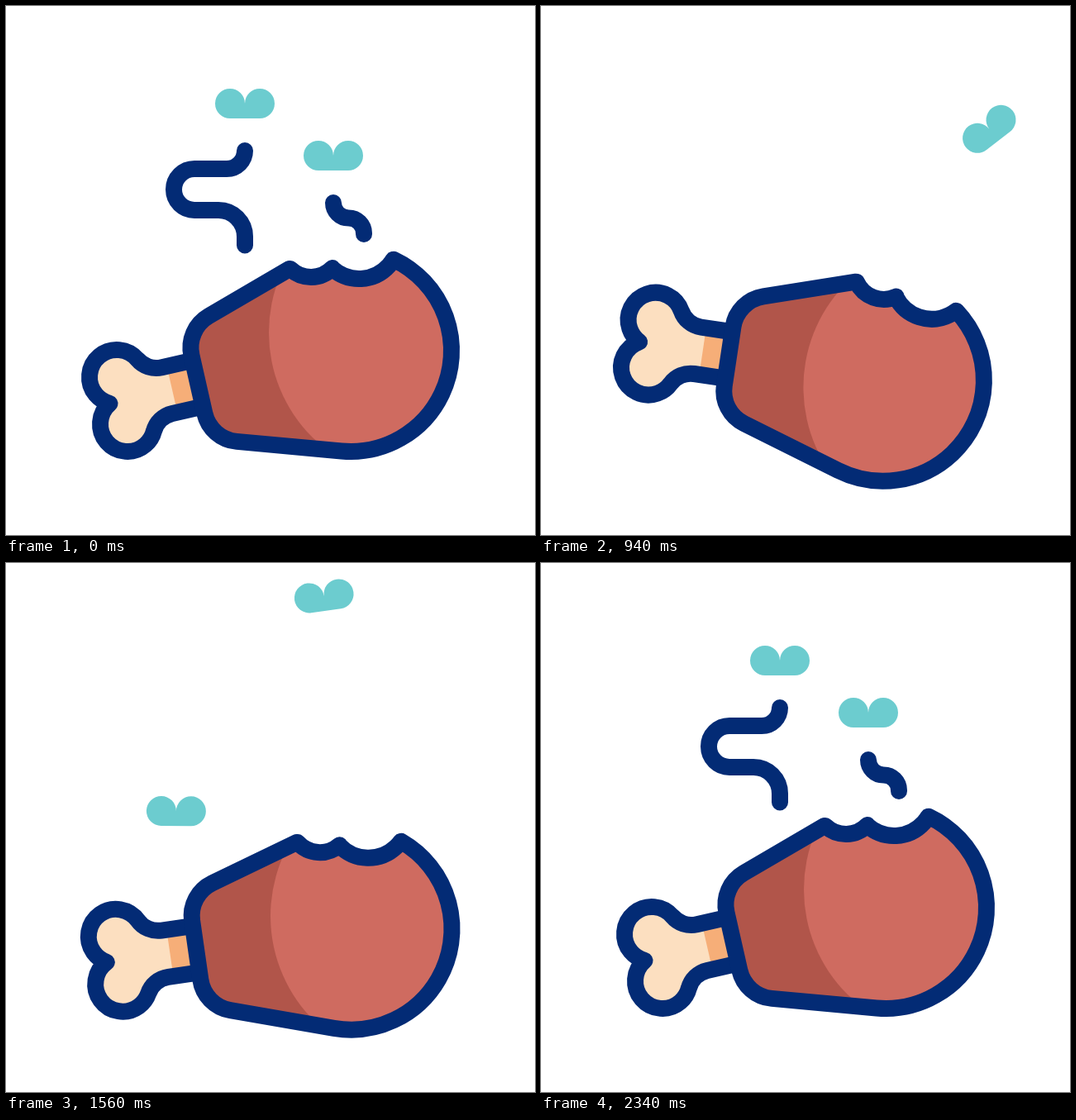
Write an HTML page with a canvas that moves like this. It is 640x640 px and loops after 2.4 s.

```html
<!DOCTYPE html>
<html lang="en">
<head>
<meta charset="utf-8">
<title>Drumstick</title>
<style>
  html, body { margin: 0; width: 100%; height: 100%; overflow: hidden; background: #fff; }
  canvas { display: block; width: 640px; height: 640px; }
</style>
</head>
<body>
<canvas id="stage"></canvas>
<script>
const LOOP = 2400, START = 100, END = 2340;
const NAVY = '#032b75', TEAL = '#6ccccf', MEAT = '#cf6b60', SHADE = '#b1554a',
      BONE = '#fcdfc0', BAND = '#f6ae78';

const canvas = document.getElementById('stage');
const ctx = canvas.getContext('2d');
const ratio = window.devicePixelRatio || 1;
canvas.width = canvas.height = 640 * ratio;

const rad = degrees => degrees * Math.PI / 180;
const smooth = v => { v = Math.min(1, Math.max(0, v)); return v * v * (3 - 2 * v); };
const ramp = (t, from, to) => smooth((t - from) / (to - from));

// The leg crouches, hops backwards, lands with a nod and settles
const tilt = t => 24.8 * ramp(t, 210, 745) - 46.8 * ramp(t, 885, 1220)
                + 31.9 * ramp(t, 1220, 1680) - 9.9 * ramp(t, 1680, 2260);
const lift = t => 25 * ramp(t, 200, 740) - 55 * ramp(t, 740, 1160)
                + 55 * ramp(t, 1160, 1680) - 25 * ramp(t, 1680, 2260);

function stroke(path) {
  ctx.strokeStyle = NAVY;
  ctx.lineWidth = 20;
  ctx.lineCap = ctx.lineJoin = 'round';
  ctx.stroke(path);
}

function bodyPath() {
  const p = new Path2D();
  p.arc(417, 417, 122, rad(-64.7), rad(95.2));
  p.arcTo(247.4, 524, 217.4, 391.5, 44);
  p.arcTo(217.4, 391.5, 343, 318, 44);
  p.lineTo(343, 318);
  p.arc(369, 292, 36, rad(134), rad(44), true);
  p.lineTo(395, 317);
  p.arc(427.2, 281.5, 48.5, rad(132), rad(31.5), true);
  p.closePath();
  return p;
}

// Two overlapping lobes that flow into the neck, mirrored about y = 0
function bonePath() {
  const p = new Path2D(), lobe = 29.2, r = 33, neck = 28.5, end = 94;
  const inner = Math.atan2(lobe, -Math.sqrt(r * r - lobe * lobe)), outer = rad(27);
  p.moveTo(end, -neck);
  p.arcTo(37.4, -neck, 29.4, -44.2, 30);
  p.arc(0, -lobe, r, -outer, inner, true);
  p.arc(0, lobe, r, -inner, outer, true);
  p.arcTo(37.4, neck, end, neck, 30);
  p.lineTo(end, neck);
  return p;
}

const body = bodyPath(), bone = bonePath();

function drawLeg(t) {
  ctx.save();
  ctx.translate(318.5, 427 + lift(t));
  ctx.rotate(rad(tilt(t)));
  ctx.translate(-318.5, -427);

  ctx.save();
  ctx.translate(140.5, 477.5);
  ctx.rotate(rad(-12.85));
  ctx.fillStyle = BONE;
  ctx.fill(bone);
  ctx.fillStyle = BAND;
  ctx.fillRect(62, -28.5, 32, 57);
  stroke(bone);
  ctx.restore();

  ctx.fillStyle = SHADE;
  ctx.fill(body);
  ctx.save();
  ctx.clip(body);
  ctx.fillStyle = MEAT;
  ctx.beginPath();
  ctx.arc(497, 395, 179, 0, 2 * Math.PI);
  ctx.fill();
  ctx.restore();
  stroke(body);
  ctx.restore();
}

const longTrail = new Path2D('M289 175A22 22 0 0 1 267 197H228A25 25 0 0 0 228 247H257A32 32 0 0 1 289 279V289.5');
const shortTrail = new Path2D('M396 238A18.5 18.5 0 0 0 414.5 256.5A18.5 18.5 0 0 1 433 275V276');

function drawTrail(path, length, shown) {
  if (shown <= 0.001) return;
  ctx.save();
  if (shown < 1) ctx.setLineDash([length * shown, length * 2]);
  stroke(path);
  ctx.restore();
}

// A round trip from home through [time, x, y, degrees]
const trip = (x, y, ...stops) => [[START, x, y, 0], ...stops, [END, x, y, 0]];

const leftTrip = trip(289, 118,
  [360, 297.5, 71, -4], [620, 265.5, 1.5, -9.5], [860, -60, -80, 20],
  [1100, -50, 370, 75], [1360, 154.5, 360.5, 57], [1760, 228.5, 236, -43.3]);
const rightTrip = trip(396, 181,
  [360, 445, 195, 24], [620, 528, 202.5, 54.7], [740, 576, 190, 20], [940, 542.5, 149, -37.7],
  [1360, 435, 85, -13.6], [1560, 385, 40, -8], [1760, 323, 66, 0.8]);

// Smooth curve through the stops, at rest at home
function along(stops, t) {
  const last = stops.length - 1;
  t = Math.min(END, Math.max(START, t));
  let i = 0;
  while (i < last - 1 && t > stops[i + 1][0]) i++;
  const a = stops[i], b = stops[i + 1], span = b[0] - a[0];
  const u = (t - a[0]) / span, s = smooth(u);
  const slope = (k, c) => k === 0 || k === last ? 0 :
    (stops[k + 1][c] - stops[k - 1][c]) / (stops[k + 1][0] - stops[k - 1][0]);
  return [1, 2, 3].map(c => a[c] + (b[c] - a[c]) * s +
    span * u * (1 - u) * (slope(i, c) * (1 - u) - slope(i + 1, c) * u));
}

function drawFly(stops, t) {
  const [x, y, turn] = along(stops, t);
  ctx.save();
  ctx.translate(x, y);
  ctx.rotate(rad(turn));
  ctx.fillStyle = TEAL;
  ctx.beginPath();
  ctx.arc(-18, 0, 18, rad(90), rad(360));
  ctx.arc(18, 0, 18, rad(180), rad(450));
  ctx.closePath();
  ctx.fill();
  ctx.restore();
}

function draw(t) {
  ctx.setTransform(ratio, 0, 0, ratio, 0, 0);
  ctx.fillStyle = '#fff';
  ctx.fillRect(0, 0, 640, 640);
  drawLeg(t);
  const shown = 1 - ramp(t, START, 500) + ramp(t, 2180, END);
  drawTrail(longTrail, 242, shown);
  drawTrail(shortTrail, 59, shown);
  drawFly(leftTrip, t);
  drawFly(rightTrip, t);
}

const begin = performance.now();
function tick() {
  draw((performance.now() - begin) % LOOP);
  requestAnimationFrame(tick);
}
tick();
</script>
</body>
</html>
```
